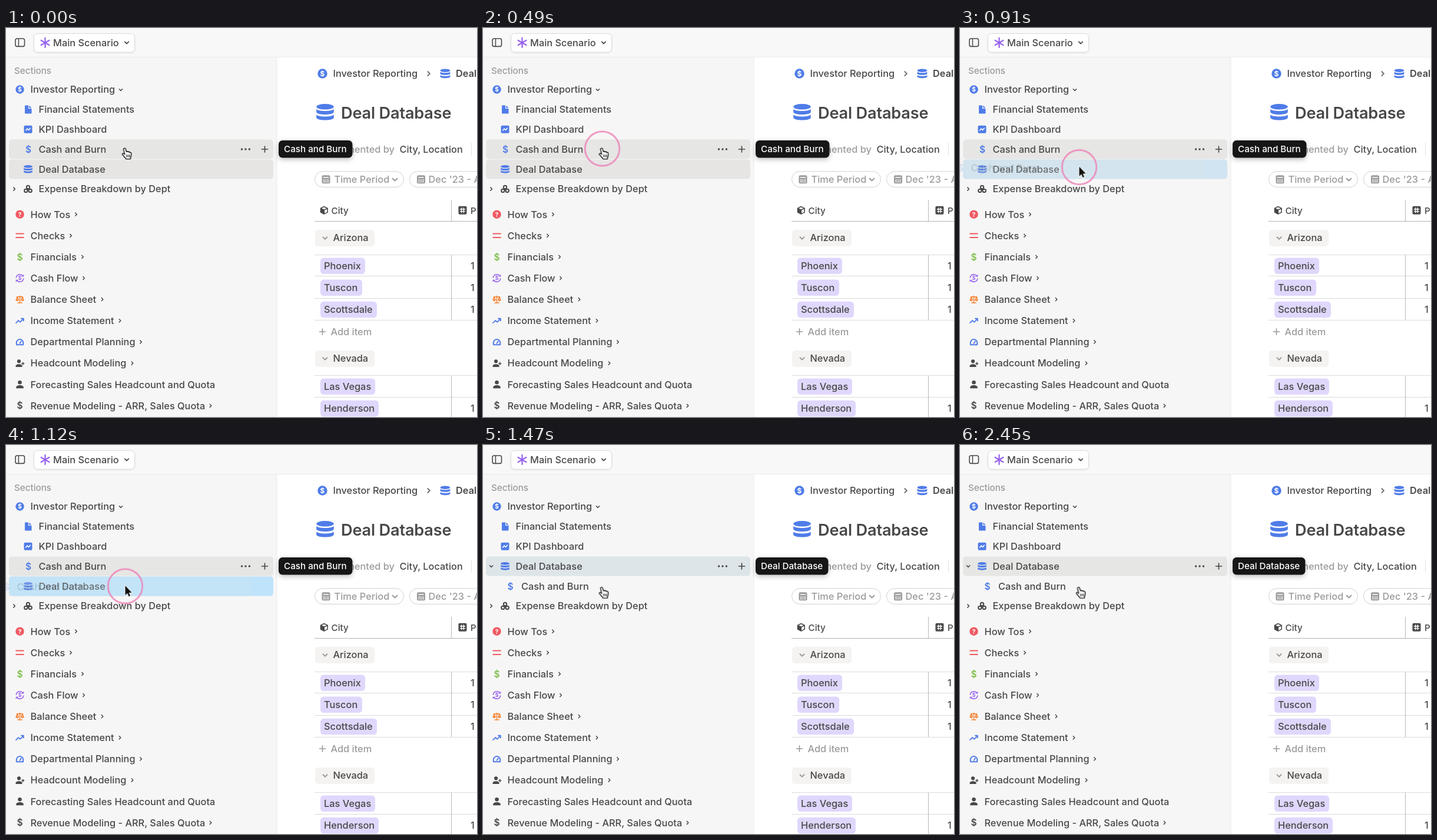
These frames come from a looping animation (800 px wide and 661 px high, 2.52 s). An HTML page:

```html
<!DOCTYPE html>
<html lang="en">
<head>
<meta charset="utf-8">
<title>Sidebar drag and drop</title>
<style>
html, body { margin: 0; width: 100%; height: 100%; overflow: hidden; background: #fff; }
svg { display: block; }
text { font: 500 16.35px Inter, sans-serif; font-optical-sizing: none; fill: #484848; white-space: pre; }
.small { font-size: 15.2px; }
.mute { fill: #9b9b9b; }
.strong { font-weight: 600; }
.title { font-weight: 600; font-size: 27.2px; letter-spacing: -.2px; }
.tip { font-size: 15.2px; fill: #fff; }
.glyph { font-weight: 600; font-size: 15.5px; text-anchor: middle; fill: currentColor; }
.inner { font-weight: 700; font-size: 10.5px; text-anchor: middle; fill: #fff; }
.line { fill: none; stroke: currentColor; stroke-linecap: round; stroke-linejoin: round; }
.blue { color: #4f7ce8; }
.dark { color: #484848; }
.gray { color: #9b9b9b; }

.anim { animation: 2520ms step-end infinite; }
.before { animation-name: before; }
.after { animation-name: after; }
.move { animation-name: move; }
.ring { animation-name: ring; }
.hand { animation-name: hand; }
.arrow { animation-name: arrow; }
.ghost { animation-name: ghost; }
.dim { animation-name: dim; }
.marker { animation-name: marker; }
.target { animation-name: target; }
.dropped { animation-name: dropped; }

@keyframes before { 0% { opacity: 1 } 55.55%, 100% { opacity: 0 } }
@keyframes after { 0% { opacity: 0 } 55.55%, 100% { opacity: 1 } }
@keyframes move {
  0%, 19.44% { transform: translateY(0) }
  22.22% { transform: translateY(2px) }
  25% { transform: translateY(9px) }
  27.77% { transform: translateY(17px) }
  30.55% { transform: translateY(24px) }
  33.33% { transform: translateY(29px) }
  36.11% { transform: translateY(31.5px) }
  38.88% { transform: translateY(33px) }
  41.66% { transform: translateY(34px); animation-timing-function: steps(4) }
  52.77%, 100% { transform: translateY(37.5px) }
}
@keyframes ring {
  0% { opacity: 0; transform: scale(1.2) }
  11.11% { opacity: .25; transform: scale(1.2) }
  13.88% { opacity: .6; transform: scale(1.08) }
  16.66% { opacity: .8; transform: scale(1); stroke-width: 2.9px }
  52.77% { opacity: .75; transform: scale(1.1); stroke-width: 1.8px }
  55.55% { opacity: .25; transform: scale(1.18); stroke-width: 1px }
  58.33%, 100% { opacity: 0; transform: scale(1.2) }
}
@keyframes hand { 0% { opacity: 1 } 25% { opacity: 0 } 52.77%, 100% { opacity: 1 } }
@keyframes arrow { 0% { opacity: 0 } 25% { opacity: 1 } 52.77%, 100% { opacity: 0 } }
@keyframes ghost { 0% { opacity: 0 } 25% { opacity: .2 } 55.55%, 100% { opacity: 0 } }
@keyframes dim { 0% { opacity: 1 } 25%, 100% { opacity: .85 } }
@keyframes marker { 0% { opacity: 0 } 27.77% { opacity: 1 } 33.33%, 100% { opacity: 0 } }
@keyframes target {
  0% { opacity: 0 }
  33.33% { opacity: .25 }
  36.11% { opacity: .55 }
  38.88% { opacity: .85 }
  41.66%, 100% { opacity: 1 }
}
@keyframes dropped {
  0% { opacity: 0 }
  55.55% { opacity: .6 }
  58.33% { opacity: .22 }
  61.11% { opacity: .08 }
  63.88%, 100% { opacity: 0 }
}
</style>
</head>
<body>
<svg width="800" height="661" viewBox="0 0 800 661">
  <defs>
    <filter id="soft" x="-20%" y="-60%" width="140%" height="240%">
      <feDropShadow dx="0" dy="3" stdDeviation="4.5" flood-opacity=".25"/>
    </filter>
    <filter id="lift" x="-10%" y="-20%" width="120%" height="150%">
      <feDropShadow dx="0" dy="1" stdDeviation="1" flood-opacity=".1"/>
    </filter>
    <path id="right" class="line" stroke-width="1.5" d="M-1.2-2.6L1.4 0L-1.2 2.6"/>
    <path id="down" class="line" stroke-width="1.5" d="M-2.7-1.3L0 1.4L2.7-1.3"/>
    <path id="plus" class="line" stroke-width="1.7" d="M-5 0H5M0-5V5"/>
    <g id="coin"><circle r="7.2" fill="currentColor"/><text class="inner" y="3.8">$</text></g>
    <g id="help"><circle r="7.2" fill="currentColor"/><text class="inner" y="3.9">?</text></g>
    <text id="dollar" class="glyph" y="5.6">$</text>
    <path id="doc" fill="currentColor" d="M-5.5-7H.5V-1.5H6V6Q6 7 5 7H-4.5Q-5.5 7-5.5 6ZM1.8-7L6-2.8H1.8Z"/>
    <g id="chart">
      <rect x="-7" y="-6.5" width="14" height="13" rx="2" fill="currentColor"/>
      <path d="M-4.2 2.2L-1.4-1.2L1 1L4.2-2.6" fill="none" stroke="#fff" stroke-width="1.6"/>
    </g>
    <g id="db" fill="currentColor">
      <ellipse cy="-9.2" rx="14.8" ry="4.8"/>
      <path id="band" d="M-14.8-5.2C-11-.9 11-.9 14.8-5.2V-.2C14.8 5.5-14.8 5.5-14.8-.2Z"/>
      <use href="#band" y="9.4"/>
    </g>
    <g id="tri" class="line" stroke-width="2">
      <circle cy="-3" r="2.7"/><circle cx="-3.7" cy="2.9" r="2.7"/><circle cx="3.7" cy="2.9" r="2.7"/>
      <circle cy=".8" r=".8"/>
    </g>
    <path id="equal" class="line" stroke-width="2" d="M-6.3-3.2H6.3M-6.3 3.2H6.3"/>
    <g id="cycle">
      <path class="line" stroke-width="1.6" d="M-6.2-1A6.3 6.3 0 0 1 4.6-4.3M6.2 1A6.3 6.3 0 0 1-4.6 4.3"/>
      <path d="M6.8-6.6V-2.6H2.8ZM-6.8 6.6V2.6H-2.8Z" fill="currentColor"/>
      <text class="glyph" style="font-size:9.5px" y="3.4">$</text>
    </g>
    <g id="scale">
      <path class="line" stroke-width="1.5" d="M0-6V5.8M-3.6 5.8H3.6M-5-4.4H5M-4.4-4L-6.5 1H-2.3ZM4.4-4L2.3 1H6.5Z"/>
      <path d="M-7 1H-1.8Q-4.4 5-7 1ZM1.8 1H7Q4.4 5 1.8 1Z" fill="currentColor"/>
    </g>
    <path id="trend" class="line" stroke-width="1.9" d="M-6.5 3.8L-2.5-.2L.8 2.4L6-3M2.4-3.6H6.3V.3"/>
    <path id="gauge" class="line" stroke-width="1.9" d="M-5.6 4.9C-8.2-7.6 8.2-7.6 5.6 4.9ZM0 2.4L2.4-1"/>
    <g id="person" fill="currentColor">
      <circle cy="-3.4" r="3.3"/><path d="M-6.3 6.7V5C-6.3 .2 6.3 .2 6.3 5V6.7Z"/>
    </g>
    <g id="add">
      <g fill="currentColor"><circle cx="-1.5" cy="-3.2" r="3.1"/><path d="M-7 6.5V5C-7 .6 4 .6 4 5V6.5Z"/></g>
      <path class="line" stroke-width="1.5" d="M3.2 .8H7.2M5.2-1.2V2.8"/>
    </g>
    <g id="cal">
      <rect x="-7" y="-7" width="14" height="14" rx="2.5" fill="currentColor"/>
      <path d="M-4.8-3.3H4.8M-4.6 1H4.6M-4.6 4H4.6" stroke="#fff" stroke-width="1.7"/>
      <path d="M-1.6-.5V5.5M1.6-.5V5.5" stroke="#9b9b9b" stroke-width="1.3"/>
    </g>
    <g id="cube">
      <path class="line" stroke-width="1.6" d="M0-6.3L5.8-3.4V3.3L0 6.3L-5.8 3.3V-3.4ZM-5.8-3.4L0-.6L5.8-3.4M0-.6V6.3"/>
      <path d="M-5.8-3.4L0-.6V6.3L-5.8 3.3Z" fill="currentColor"/>
    </g>
    <g id="hash">
      <rect x="-7" y="-7" width="14" height="14" rx="2" fill="currentColor"/>
      <path d="M-4.5-1.8H4.5M-4.5 1.8H4.5M-1.8-4.5V4.5M1.8-4.5V4.5" stroke="#fff" stroke-width="1.3"/>
    </g>
    <g id="tools" class="dark">
      <g fill="currentColor"><circle cx="400.6" r="1.7"/><circle cx="407" r="1.7"/><circle cx="413.4" r="1.7"/></g>
      <use href="#plus" x="439.5"/>
    </g>
    <rect id="bar" x="5" y="-16.5" width="449" height="33" rx="5"/>
  </defs>

  <rect width="800" height="661" fill="#fff"/>
  <rect width="461" height="661" fill="#f7f6f6"/>
  <path d="M459.5 50V661" stroke="#f1f0f0"/>
  <rect width="800" height="49" fill="#f9f8f8"/>
  <path d="M0 49.5H800" stroke="#ebeaea"/>

  <g class="dark">
    <rect class="line" x="16" y="18" width="15.5" height="13.4" rx="2.8" stroke-width="1.6"/>
    <path d="M21.4 18V31.4" stroke="currentColor" stroke-width="1.5"/>
    <rect x="47.5" y="9.5" width="171" height="31.5" rx="6" fill="#fff" stroke="#dddcdc" filter="url(#lift)"/>
    <path d="M66.5 17V33M59.6 21L73.4 29M59.6 29L73.4 21" stroke="#9763ee" stroke-width="2.3" stroke-linecap="round"/>
    <text x="80" y="30.9">Main Scenario</text>
    <use href="#down" transform="translate(205 25) scale(1.2)"/>
  </g>

  <g id="main"></g>
  <text class="mute small" x="14" y="78.4">Sections</text>
  <g id="side"></g>

  <g class="anim before">
    <g transform="translate(0 206)">
      <use href="#bar" fill="#e6e6e4"/>
      <use href="#dollar" x="38" class="blue"/>
      <text x="55.5" y="5.9">Cash and Burn</text>
      <use href="#tools"/>
    </g>
    <g transform="translate(0 240)">
      <use href="#bar" fill="#e6e5e4"/>
      <use href="#bar" fill="#bfe3fb" class="anim target"/>
      <g class="anim dim">
        <use href="#db" transform="translate(37.5) scale(.5)" class="blue"/>
        <text x="55.5" y="5.9">Deal Database</text>
      </g>
    </g>
    <rect class="anim marker" x="14" y="223.5" width="445" height="4.5" fill="#85ccfa"/>
    <g transform="translate(463 191)">
      <rect width="125.5" height="29.5" rx="6.5" fill="#161616" filter="url(#soft)"/>
      <text class="tip" x="9" y="20.4">Cash and Burn</text>
    </g>
  </g>

  <g class="anim after">
    <g transform="translate(0 206)">
      <use href="#bar" fill="#e6e6e4"/>
      <use href="#bar" fill="#c1e3f9" class="anim dropped"/>
      <use href="#down" x="14" class="dark"/>
      <use href="#db" transform="translate(37.5) scale(.5)" class="blue"/>
      <text x="55.5" y="5.9">Deal Database</text>
      <use href="#tools"/>
    </g>
    <g transform="translate(0 240)">
      <use href="#dollar" x="46.5" class="blue"/>
      <text x="65" y="5.9">Cash and Burn</text>
    </g>
    <g transform="translate(463 191)">
      <rect width="123.5" height="29.5" rx="6.5" fill="#161616" filter="url(#soft)"/>
      <text class="tip" x="9" y="20.4">Deal Database</text>
    </g>
  </g>

  <g class="anim move">
    <g class="anim ghost" transform="translate(-37 206.3)">
      <use href="#bar" fill="#e6e6e4" opacity=".6"/>
      <use href="#dollar" x="38" class="blue"/>
      <text x="55.5" y="5.9">Cash and Burn</text>
    </g>
    <g transform="translate(202.5 205)">
      <circle class="anim ring" r="29.2" fill="none" stroke="#ee80b6" stroke-width="2.9"/>
      <path class="anim arrow" d="M0-1V15.5L3.7 12L6 17.6L8.6 16.5L6.3 11H11.2Z" fill="#111" stroke="#fff" stroke-width="2" stroke-linejoin="round" paint-order="stroke"/>
      <g class="anim hand" fill="#fff" stroke="#111" stroke-width="1.4" stroke-linejoin="round" stroke-linecap="round">
        <path d="M-2.9 1.3C-3.2-1.2 .2-1.3 .7 .8L2 5.4C2.4 4 4.7 4.2 5 5.8C5.8 4.7 7.7 5.1 8 6.8C8.8 6.1 10.2 6.6 10.3 8.2C10.6 11.4 10.2 13.3 9 15.2V17.6H1.4C.2 15.6-2.6 12.6-4.6 10.2C-5.7 8.6-3.8 7.2-2.5 8.3L-.8 9.8Z"/>
        <path d="M2.4 10.6V14.2M5 10.6V14.2M7.5 10.6V14.2" fill="none" stroke-width="1.1"/>
      </g>
    </g>
  </g>
</svg>
<script>
const text = (x, y, s, cls = "") => `<text x="${x}" y="${y + 5.9}" class="${cls}">${s}</text>`;
const icon = (id, x, y, color = "#484848", k = 1) =>
  `<use href="#${id}" transform="translate(${x} ${y}) scale(${k})" style="color:${color}"/>`;
const line = (d, color) => `<path d="${d}" stroke="${color}"/>`;
const BLUE = "#4f7ce8", DARK = "#484848", GRAY = "#9b9b9b", RED = "#ef5a62";

// label, icon, colour, chevron x
const sections = [
  ["How Tos", "help", RED, 119],
  ["Checks", "equal", RED, 110],
  ["Financials", "dollar", "#7fbf4d", 130],
  ["Cash Flow", "cycle", "#9763ee", 132],
  ["Balance Sheet", "scale", "#f4812f", 163.5],
  ["Income Statement", "trend", BLUE, 193.5],
  ["Departmental Planning", "gauge", BLUE, 229],
  ["Headcount Modeling", "add", DARK, 214.5],
  ["Forecasting Sales Headcount and Quota", "person", DARK, 0],
  ["Revenue Modeling - ARR, Sales Quota", "dollar", DARK, 347.5],
];
const sub = (label, id, y, color) => icon(id, 37.5, y, color) + text(55.5, y, label);

side.innerHTML =
  icon("coin", 23.5, 104.5, BLUE) + text(41.5, 104.5, "Investor Reporting") + icon("down", 195, 105) +
  sub("Financial Statements", "doc", 138.5, BLUE) +
  sub("KPI Dashboard", "chart", 172.3, BLUE) +
  icon("right", 14, 273.5) + sub("Expense Breakdown by Dept", "tri", 273.5, DARK) +
  sections.map(([label, id, color, x], i) => {
    const y = 316.7 + i * 36.12;
    return icon(id, 23.5, y, color) + text(41.5, y, label) + (x ? icon("right", x, y) : "");
  }).join("");

const group = (y, label) =>
  `<rect x="525" y="${y - 14}" width="101" height="28" rx="5" fill="#f4f3f2"/>` +
  icon("down", 542, y, GRAY, 1.3) + text(555.5, y - .5, label);
const chip = (y, w, label, value = "") =>
  `<rect x="534" y="${y - 13.5}" width="${w}" height="27.5" rx="5.5" fill="#e0d7fc"/>` +
  text(540, y, label) + text(789, y, value);
const pill = (x, w) =>
  `<rect x="${x}" y="243.8" width="${w}" height="26.6" rx="13.3" fill="#fff" stroke="#d2d1d1"/>`;
const rules = ys => ys.map(y => line(`M524 ${y}H800`, "#dcdbdb")).join("");

main.innerHTML =
  icon("coin", 537.5, 77.5, BLUE, 1.14) + text(555.5, 77.4, "Investor Reporting") +
  icon("right", 718, 77.5, "#777", 1.35) + icon("db", 746, 77.5, BLUE, .57) + text(764, 77.4, "Deal", "strong") +
  icon("db", 542, 143, BLUE) + text(569, 147.8, "Deal Database", "title") +
  `<text x="660" y="211.9" class="mute" text-anchor="end">Segmented by</text>` +
  text(668.5, 206, "City, Location") + line("M790.5 195V217", "#e2e1e1") +
  pill(524.5, 151) + icon("cal", 543.5, 257.3, GRAY) + text(557.5, 257.3, "Time Period", "mute") +
  icon("down", 660.5, 257.5, GRAY, 1.4) +
  pill(685.5, 180) + icon("cal", 705, 257.3, GRAY) + text(717.5, 257.3, "Dec '23 - Apr", "mute") +
  icon("cube", 540.3, 309.8) + text(552.5, 310, "City", "small") +
  icon("hash", 775.5, 309.8) + text(789, 310, "P", "small") +
  line("M524 328.5H800", "#b4b3b3") + rules([385.5, 421.5, 459.5, 496.5, 590.5, 627.5]) +
  line("M756.5 292V328M756.5 386V496M756.5 591V661", "#b9b8b8") +
  group(357, "Arizona") +
  chip(404, 76, "Phoenix", "1") + chip(441, 71, "Tuscon", "1") + chip(478.3, 96, "Scottsdale", "1") +
  icon("plus", 537.5, 516, GRAY) + text(551.5, 516, "Add item", "mute") +
  group(562, "Nevada") +
  chip(609, 93, "Las Vegas") + chip(646.3, 99, "Henderson", "1");
</script>
</body>
</html>
```
